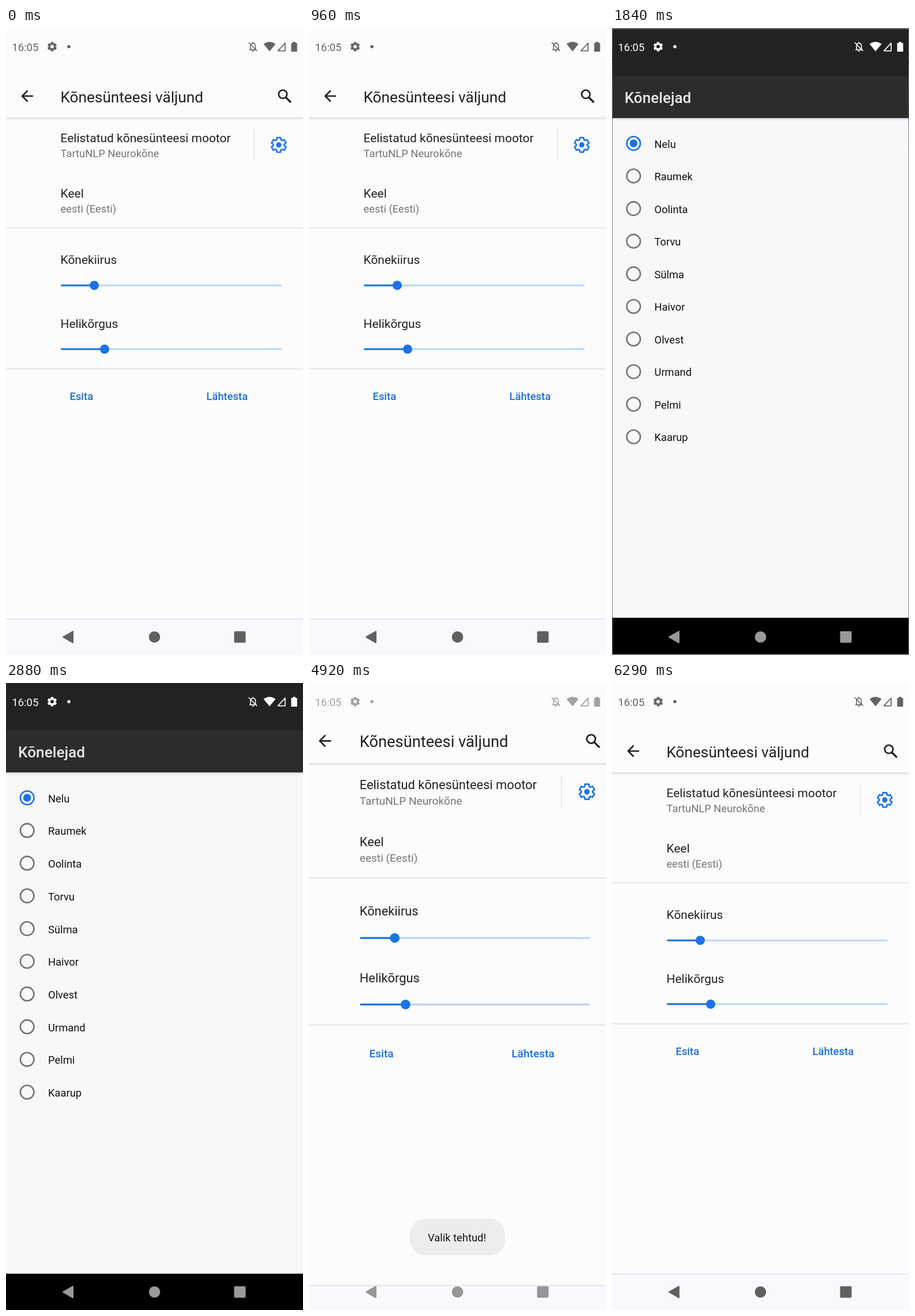
Recreate the animation shown at these times as an HTML page. Size 515 px wide and 1087 px high, loop 6500 ms.

```html
<!DOCTYPE html>
<html lang="et">
<head>
<meta charset="utf-8">
<title>Kõnesünteesi väljund</title>
<style>
  html, body { margin: 0; width: 100%; height: 100%; overflow: hidden; background: #fcfcfd; }
  svg { display: block; width: 100%; height: 100%; font-family: Roboto, sans-serif; }
  .line { fill: none; stroke-linejoin: round; }
</style>
</head>
<body>
<svg viewBox="0 0 515 1087" id="stage">
  <defs>
    <linearGradient id="fall" x2="0" y2="1">
      <stop offset="0" stop-color="#000" stop-opacity=".13"/>
      <stop offset="1" stop-color="#000" stop-opacity="0"/>
    </linearGradient>
    <clipPath id="gearCell"><rect x="431" y="154.5" width="84" height="95" rx="5"/></clipPath>
  </defs>
  <g id="settings"></g>
  <rect id="shade" width="515" height="1087"/>
  <g id="picker"></g>
  <g id="status"></g>
  <g id="nav"></g>
  <g id="toast"></g>
</svg>
<script>
const LOOP = 6500;
const OPEN = 1585, CLOSE = 4845, WINDOW_MS = 400;
const PICK = 3150;
const BLUE = '#1a73e8', RULE = '#dcdce3', INK = '#202124', SOFT = '#757575';
const NAMES = ['Nelu', 'Raumek', 'Oolinta', 'Torvu', 'Sülma', 'Haivor', 'Olvest', 'Urmand', 'Pelmi', 'Kaarup'];

const $ = id => document.getElementById(id);
const rect = (x, y, w, h, fill, rx = 0) =>
  `<rect x="${x}" y="${y}" width="${w}" height="${h}" rx="${rx}" fill="${fill}"/>`;
const circle = (x, y, r, fill, extra = '') => `<circle cx="${x}" cy="${y}" r="${r}" fill="${fill}" ${extra}/>`;
const text = (x, y, size, fill, label, weight = 400) =>
  `<text x="${x}" y="${y}" font-size="${size}" fill="${fill}" font-weight="${weight}">${label}</text>`;
const fillPath = (d, extra = '') => `<path d="${d}" fill="currentColor" ${extra}/>`;
const linePath = (d, width, color = 'currentColor') =>
  `<path class="line" d="${d}" stroke="${color}" stroke-width="${width}"/>`;

// Six-toothed cog outline, one tooth pointing straight up
function cog(cx, cy, outer, inner) {
  const points = [];
  for (let k = 0; k < 6; k++)
    for (const [deg, r] of [[-24, inner], [-14, outer], [14, outer], [24, inner]]) {
      const a = (k * 60 + deg - 90) * Math.PI / 180;
      points.push(`${(cx + r * Math.cos(a)).toFixed(2)} ${(cy + r * Math.sin(a)).toFixed(2)}`);
    }
  return `M${points.join('L')}Z`;
}

const slider = (y, thumb) =>
  rect(95, y - 1.5, 383, 3, '#bbd6fa', 1.5) + rect(95, y - 1.5, thumb - 95, 3, BLUE, 1.5) + circle(thumb, y, 8, BLUE);

$('settings').innerHTML =
  rect(0, 0, 515, 1087, '#fcfcfd') +
  rect(0, 155, 515, 5, 'url(#fall)') +
  linePath('M47 118H28M37.5 108.5L28 118L37.5 127.5', 2.6, INK) +
  text(94.5, 128.5, 26.2, INK, 'Kõnesünteesi väljund') +
  circle(480, 114.8, 7.2, 'none', `stroke="${INK}" stroke-width="2.7"`) +
  linePath('M485 120L494 129', 3.2, INK) +
  text(94.5, 198, 20.98, INK, 'Eelistatud kõnesünteesi mootor') +
  text(94.5, 224, 18.36, SOFT, 'TartuNLP Neurokõne') +
  rect(430, 176, 1.3, 53.5, RULE) +
  `<g clip-path="url(#gearCell)">${circle(473, 202, 0, '#e2e2e4', 'id="ripple"')}</g>` +
  linePath(cog(473, 202.7, 13, 9.6), 2.6, BLUE) + circle(473, 202.7, 4.6, BLUE) +
  text(94.5, 293.8, 20.98, INK, 'Keel') +
  text(94.5, 319.5, 18.36, SOFT, 'eesti (Eesti)') +
  rect(0, 345.7, 515, 1.4, RULE) +
  text(94.5, 409, 20.98, INK, 'Kõnekiirus') + slider(446.2, 153) +
  text(94.5, 519.7, 20.98, INK, 'Helikõrgus') + slider(556.8, 171) +
  rect(0, 590.2, 515, 1.4, RULE) +
  text(110.5, 644.5, 18.36, '#1c6fd6', 'Esita', 500) +
  text(347.5, 644.5, 18.36, '#1c6fd6', 'Lähtesta', 500) +
  rect(0, 1024, 515, 63, '#f9f9fd') + rect(0, 1024, 515, 1.4, RULE);

const rowY = i => 199 + 56.7 * i;
$('picker').innerHTML =
  rect(0, 0, 515, 1087, '#f8f8fb') +
  rect(0, 0, 515, 82, '#222221') + rect(0, 81.5, 515, 73.5, '#2c2c2b') +
  rect(0, 155, 515, 5, 'url(#fall)') +
  text(21, 128.5, 26.2, '#e8e8e8', 'Kõnelejad', 500) +
  NAMES.map((name, i) =>
    circle(36.7, rowY(i), 11.8, 'none', 'class="ring" stroke-width="2.6"') +
    circle(36.7, rowY(i), 0, BLUE, 'class="pip"') +
    text(73, rowY(i) + 7.7, 18.36, '#111', name)).join('') +
  rect(0, 1024, 515, 63, '#000');

$('status').innerHTML =
  text(10.5, 39.5, 18.36, 'currentColor', '16:05') +
  fillPath(cog(80, 32.3, 8.4, 6.3) + 'M83 32.3a3 3 0 1 0 -6 0a3 3 0 1 0 6 0Z', 'fill-rule="evenodd"') +
  circle(109, 32.3, 2.8, 'currentColor') +
  linePath('M422 37.6H434.5M424 37V31Q424 26.5 428.2 26.5Q432.5 26.5 432.5 31V37M428.2 24V26M420.8 25L435.2 40', 1.6) +
  fillPath('M426.4 39H430Q430 41 428.2 41Q426.4 41 426.4 39Z') +
  fillPath('M457 40.6L446.6 27.8Q457 20.2 467.4 27.8Z') +
  linePath('M471.5 39.6H484V26.2Z', 1.7) +
  fillPath('M494.5 26H497.3V24H502V26H504.8V41H494.5Z');

$('nav').innerHTML =
  fillPath('M99 1055.8L116 1046V1065.6Z', 'stroke="currentColor" stroke-width="2" stroke-linejoin="round"') +
  circle(257.5, 1055.8, 9.8, 'currentColor') + rect(395.5, 1045.8, 20, 20, 'currentColor', 2);

$('toast').innerHTML =
  rect(174.5, 928.5, 166, 64.5, 'rgba(0,0,0,.025)', 28) + rect(175, 928.5, 165, 63.5, '#ededee', 27) +
  text(206, 967.5, 18.36, '#161616', 'Valik tehtud!');

const rings = document.querySelectorAll('.ring'), pips = document.querySelectorAll('.pip');

const ramp = (t, from, to) => Math.min(1, Math.max(0, (t - from) / (to - from)));
const mix = (a, b, p) => a + (b - a) * p;

function cubic(s, a, b, c, d) {
  const r = 1 - s;
  return a * r ** 3 + 3 * b * r * r * s + 3 * c * r * s * s + d * s ** 3;
}

// Fast start, very slow finish: two joined Bézier pieces
function windowEase(x) {
  const [px, py] = x < 1 / 6
    ? [[0, .05, .1333, 1 / 6], [0, 0, .06, .4]]
    : [[1 / 6, .2083, .25, 1], [.4, .82, 1, 1]];
  let low = 0, high = 1;
  for (let i = 0; i < 24; i++) {
    const mid = (low + high) / 2;
    if (cubic(mid, ...px) < x) low = mid; else high = mid;
  }
  return cubic(low, ...py);
}

function zoom(el, k) {
  el.setAttribute('transform', `translate(257.5 543.5) scale(${k}) translate(-257.5 -543.5)`);
}

function gray(el, value) {
  const v = Math.round(value);
  el.style.color = `rgb(${v},${v},${v})`;
}

function draw(t) {
  const opening = windowEase(ramp(t, OPEN, OPEN + WINDOW_MS));
  const closing = windowEase(ramp(t, CLOSE, CLOSE + WINDOW_MS));
  const leaving = t >= CLOSE;

  zoom($('settings'), leaving ? mix(1.1, 1, closing) : mix(1, 1.15, opening));
  zoom($('picker'), leaving ? mix(1, .9, closing) : mix(.85, 1, opening));
  $('picker').style.opacity = ramp(t, OPEN + 45, OPEN + 95) * (1 - ramp(t, CLOSE + 20, CLOSE + 70));
  $('shade').style.opacity = leaving ? 0 : .58 * ramp(t, OPEN + 45, OPEN + 150);

  const press = ramp(t, 1400, 1615);
  $('ripple').setAttribute('r', press > 0 && !leaving ? mix(18, 64, 1 - (1 - press) ** 2) : 0);
  $('ripple').style.opacity = ramp(t, 1400, 1475);

  gray($('status'), mix(mix(100, 255, ramp(t, 1600, 1720)), 100, ramp(t, 4850, 4968)));
  gray($('nav'), mix(mix(96, 153, ramp(t, 1500, 1610)), 96, ramp(t, 4915, 5035)));

  const picked = ramp(t, PICK, PICK + 180);
  rings.forEach((ring, i) => {
    const on = i === 0 ? 1 - picked : i === 1 ? picked : 0;
    ring.setAttribute('stroke', on > .5 ? BLUE : SOFT);
    pips[i].setAttribute('r', 6.8 * on);
  });

  $('toast').style.opacity = ramp(t, 3210, 3460) * (1 - ramp(t, 5240, 5460));
}

const start = performance.now();
function tick() {
  draw((performance.now() - start) % LOOP);
  requestAnimationFrame(tick);
}
tick();
</script>
</body>
</html>
```
